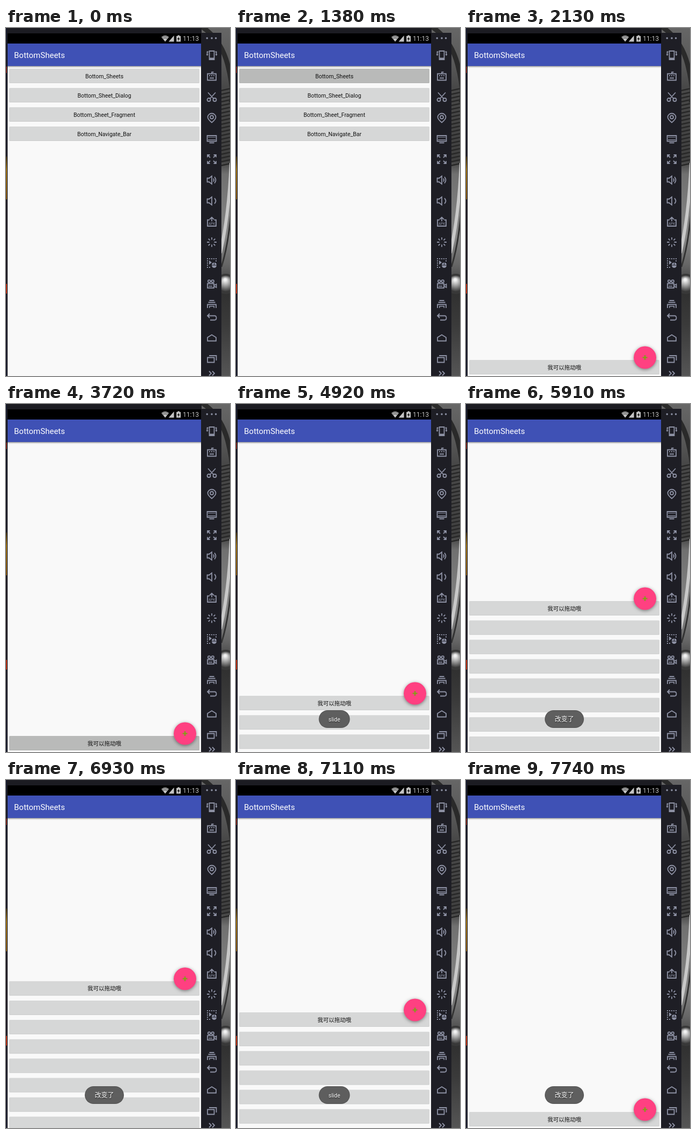
Animation, 418 px wide and 650 px high, one loop 8 s. Source, as an HTML page with a canvas:

```html
<!DOCTYPE html>
<html lang="zh-CN">
<head>
<meta charset="utf-8">
<title>BottomSheets</title>
<style>
html, body { margin: 0; width: 100%; height: 100%; overflow: hidden; background: #1c1c22; }
canvas { display: block; }
</style>
</head>
<body>
<canvas id="stage" width="418" height="650"></canvas>
<script>
const ctx = document.getElementById('stage').getContext('2d');
const LOOP = 8000, STEP = 30;
const FONT = 'Roboto, "Noto Sans CJK SC", "Noto Sans CJK", sans-serif';
const ROW_GAP = 36.15, REST_Y = 620;
const MENU = ['Bottom_Sheets', 'Bottom_Sheet_Dialog', 'Bottom_Sheet_Fragment', 'Bottom_Navigate_Bar'];
const ICON_COLOR = '#8e92a5';

// Sheet position: [time, y, velocity]
const SHEET_KEYS = [
  [4440, 620, -0.08], [4920, 545, -0.22], [5250, 465, -0.24], [5910, 368, 0],
  [6900, 368, 0.25], [7110, 434, 0.38], [7710, 620, 0]
];

// Side bar icons: [y, stroked path, filled path], centred on x = 0
const ICONS = [
  [19, '', 'M-7 0a1.8 1.8 0 1 0-3.6 0a1.8 1.8 0 1 0 3.6 0M1.8 0a1.8 1.8 0 1 0-3.6 0a1.8 1.8 0 1 0 3.6 0M9.4 0a1.8 1.8 0 1 0-3.6 0a1.8 1.8 0 1 0 3.6 0'],
  [51, 'M-4.5-8H4.5V8H-4.5zM-6.5-6.5H-8.5V0M6.5-6.5H8.5V0', 'M-4.5 4.5h9V8h-9zM-10.5-2h4l-2 3zM10.5-2h-4l2 3z'],
  [90, 'M-8-4.5H8V7.5H-8zM0-4.5V-7.5H3.5', 'M-5-2h2v2h-2zM-1-2h2v2h-2zM3-2h2v2h-2zM-4 2.5h8v2h-8z'],
  [129, 'M-7-8.5L3.5 3M7-8.5L-3.5 3M-2.5 5a3 3 0 1 1-6 0a3 3 0 1 1 6 0M8.5 5a3 3 0 1 1-6 0a3 3 0 1 1 6 0', ''],
  [168, 'M0 8.5Q-7.5 2.5-7.5-1.5a7.5 7 0 0 1 15 0Q7.5 2.5 0 8.5zM3-1.5a3 3 0 1 1-6 0a3 3 0 1 1 6 0', ''],
  [207, 'M-8.5-6H8.5V4.5H-8.5zM-4.5 7.5H4.5', 'M-7-3.6H7v1.2H-7zM-7 1H7v1.2H-7z'],
  [245, 'M-8-3.5V-8H-3.5M3.5-8H8V-3.5M8 3.5V8H3.5M-3.5 8H-8V3.5M-7.5-7.5L-3-3M7.5-7.5L3-3M7.5 7.5L3 3M-7.5 7.5L-3 3', ''],
  [284, 'M-8.5-3.5H-5L0-7.5V7.5L-5 3.5H-8.5zM3-3Q5 0 3 3M5-6Q10 0 5 6', ''],
  [323, 'M-8.5-3.5H-5L0-7.5V7.5L-5 3.5H-8.5zM5-5Q10 0 5 5', ''],
  [362, 'M-4.5-3.5H-8V8H8V-3.5H4.5M0-1V-8M-4-4.5L0-8.5L4-4.5', ''],
  [400, 'M0-9V-4.5M0 9V4.5M-9 0H-4.5M9 0H4.5M-6.3-6.3L-3.5-3.5M6.3 6.3L3.5 3.5M6.3-6.3L3.5-3.5M-6.3 6.3L-3.5 3.5', ''],
  [439, '', 'M-5-5L0-1L-5 3zM0 3.5a4.5 4.5 0 0 1 4-4.4V3.5zM5-.9a4.5 4.5 0 0 1 4 4.4H5zM0 4.5H9a4.5 4.5 0 0 1-9 0z'],
  [478, 'M-8-.5H4V7.5H-8zM4.5 2.5L8.5 .5V6.5L4.5 4.5M-2.5-5a2.3 2.3 0 1 1-4.6 0a2.3 2.3 0 1 1 4.6 0M4-5a2.3 2.3 0 1 1-4.6 0a2.3 2.3 0 1 1 4.6 0', 'M-6 3.5h7v1.5h-7z'],
  [516, 'M-4.5-7H4.5M-6.5-3.5H6.5M-8 7V.5H8V7', 'M-5 3h10v1.5h-10zM-5 3h1.5v4h-1.5zM3.5 3h1.5v4h-1.5z'],
  [540, 'M-4-6.5L-8-2.5L-4 1.5M-8-2.5H5Q8.5-2.5 8.5 1.5T5 5.5H-3', ''],
  [579, 'M-8 5.5V-1L0-6L8-1V5.5z', ''],
  [618, 'M-8-2.5H4.5V6.5H-8zM-5-6H8.5V3', ''],
  [645, 'M-5-4L-1 0L-5 4M1-4L5 0L1 4', '']
].map(([y, line, fill]) => [y, new Path2D(line), new Path2D(fill)]);

function box(x, y, w, h, color) {
  ctx.fillStyle = color;
  ctx.fillRect(x, y, w, h);
}

function roundBox(x, y, w, h, r, color) {
  ctx.fillStyle = color;
  ctx.beginPath();
  ctx.roundRect(x, y, w, h, r);
  ctx.fill();
}

function disc(x, y, r, color) {
  ctx.fillStyle = color;
  ctx.beginPath();
  ctx.arc(x, y, r, 0, Math.PI * 2);
  ctx.fill();
}

function curve(path, width, color) {
  ctx.lineWidth = width;
  ctx.strokeStyle = color;
  ctx.stroke(new Path2D(path));
}

function label(text, x, y, size, color, align = 'center') {
  ctx.font = `${size}px ${FONT}`;
  ctx.textAlign = align;
  ctx.fillStyle = color;
  ctx.fillText(text, x, y);
}

function gradient(x0, y0, x1, y1, ...stops) {
  const g = ctx.createLinearGradient(x0, y0, x1, y1);
  stops.forEach(([at, color]) => g.addColorStop(at, color));
  return g;
}

function shadow(color, blur, dy) {
  ctx.shadowColor = color;
  ctx.shadowBlur = blur;
  ctx.shadowOffsetY = dy;
}

function layer(draw) {
  ctx.save();
  draw();
  ctx.restore();
}

function wallpaper() {
  box(0, 0, 418, 650, '#1c1c22');
  box(0, 0, 1.5, 650, gradient(0, 0, 0, 650, [0, '#10152c'], [0.3, '#1b1c2c'], [0.6, '#241c24'], [1, '#1d2138']));
  box(0, 72, 1, 12, '#d8321a');
  box(0, 240, 1.5, 80, gradient(0, 240, 0, 320, [0, '#4b3610'], [0.3, '#d09410'], [1, '#a86c10']));
  box(0, 478, 1.5, 18, '#f03a12');

  // Blurred grey machinery behind the emulator window
  layer(() => {
    ctx.beginPath();
    ctx.rect(365, 0, 53, 650);
    ctx.clip();
    box(365, 0, 53, 650, gradient(0, 0, 0, 650, [0, '#666'], [0.1, '#595959'], [0.17, '#484848'],
      [0.38, '#404040'], [0.42, '#707070'], [0.6, '#868686'], [0.68, '#666'], [0.76, '#303030'], [0.85, '#3a3a3a'], [1, '#555']));
    curve('M366-2Q402 22 414 70T420 140', 9, '#2a2a2a');
    for (let y = 114; y < 256; y += 7) curve(`M401 ${y + 3}L419 ${y - 1}`, 2.5, '#272727');
    curve('M420 252Q416 350 400 420', 6, '#c8c8c8');
    curve('M424 280Q420 390 402 446', 3, '#333');
    disc(410, 478, 19, '#383838');
    const shine = ctx.createRadialGradient(409, 470, 2, 410, 477, 15);
    shine.addColorStop(0, '#f2f2f2');
    shine.addColorStop(0.5, '#999');
    shine.addColorStop(1, '#3c3c3c');
    disc(410, 477, 15, shine);
  });
}

function sideBar(hover) {
  box(364, 9, 38, 641, '#1e1e25');
  if (hover) roundBox(369, 75, 30, 30, 3, '#34353f');
  ctx.lineWidth = 1.8;
  for (const [y, line, fill] of ICONS) layer(() => {
    ctx.translate(384, y);
    ctx.strokeStyle = ctx.fillStyle = ICON_COLOR;
    ctx.stroke(line);
    ctx.fill(fill);
  });
  for (let i = 0; i < 5; i++) {
    box(375 + i * 4, 430, 2, 2, ICON_COLOR);
    if (i) box(375, 430 + i * 4, 2, 2, ICON_COLOR);
    if (i === 1) box(391, 434, 2, 2, ICON_COLOR);
    if (i < 2) box(375 + i * 4, 446, 2, 2, ICON_COLOR);
  }
  label('APK', 384, 367.5, 6.5, ICON_COLOR);
}

function statusBar() {
  box(3, 10, 361, 19, '#000');
  ctx.fillStyle = '#c3c3c3';
  ctx.fill(new Path2D('M290 17Q297 11 304 17L297 25.5z'));
  ctx.fill(new Path2D('M303.5 25.5H313.5V14z'));
  curve('M290.5 18.5Q297 13 303.5 18.5M292.5 20.5Q297 16.5 301.5 20.5', 0.7, '#000');
  ctx.fill(new Path2D('M318 15H320.3V13.5H323.7V15H326V25.5H318z'));
  ctx.fillStyle = '#000';
  ctx.fill(new Path2D('M322.7 16.5L319.5 21H321.7L321.2 24.3L324.5 19.6H322.3z'));
  label('11:13', 360, 24, 12, '#c3c3c3', 'right');
}

function appFrame() {
  box(3, 29, 361, 623, '#f9f9f9');
  box(3, 71, 361, 4, gradient(0, 71, 0, 75, [0, 'rgba(0,0,0,.42)'], [0.5, 'rgba(0,0,0,.12)'], [1, 'rgba(0,0,0,0)']));
  box(3, 29, 361, 42, '#3f51b5');
  label('BottomSheets', 15, 56, 15, '#fff', 'left');
}

function button(y, text, pressed) {
  roundBox(6, y, 355, 27, 1.5, pressed ? '#b9bab9' : '#d6d7d7');
  box(7, y + 26, 353, 1, 'rgba(0,0,0,.05)');
  if (text) label(text, 183.5, y + 17.5, 10.5, '#111');
}

function menuScreen(pressed) {
  appFrame();
  MENU.forEach((text, i) => button(76 + i * 36, text, pressed && i === 0));
}

function sheetScreen(top, pressed) {
  appFrame();
  for (let i = 0, y = top; y < 652; y = top + ++i * ROW_GAP) button(y, i ? '' : '我可以拖动哦', pressed && !i);
  const y = top - 4.5;
  layer(() => {
    shadow('rgba(0,0,0,.45)', 6, 1.5);
    disc(334, y, 21, '#ff4081');
  });
  box(329.5, y - 1, 9, 2, '#78a60c');
  box(333, y - 4.5, 2, 9, '#78a60c');
}

function toast(text, alpha) {
  const slide = text === 'slide', w = slide ? 58 : 73;
  layer(() => {
    ctx.globalAlpha = alpha;
    roundBox(183.5 - w / 2, 572, w, 33, 16.5, 'rgba(72,72,72,.93)');
    roundBox(184.5 - w / 2, 573, w - 2, 31, 15.5, 'rgba(98,98,98,.8)');
    shadow('rgba(0,0,0,.75)', 2, 1);
    label(text, 183.5, 593, slide ? 10.5 : 12, '#fff');
  });
}

function sheetTop(t) {
  const next = SHEET_KEYS.findIndex(key => key[0] > t);
  if (next <= 0) return REST_Y;
  const [t0, y0, v0] = SHEET_KEYS[next - 1], [t1, y1, v1] = SHEET_KEYS[next];
  const d = t1 - t0, u = (t - t0) / d, w = 1 - u;
  return y0 * w * w * (1 + 2 * u) + v0 * d * u * w * w + y1 * u * u * (3 - 2 * u) - v1 * d * u * u * w;
}

function toastText(t) {
  const sliding = (t >= 4530 && t < 5910) || (t >= 6960 && t < 7740);
  return sliding ? 'slide' : '改变了';
}

function render(now) {
  const t = Math.floor((now % LOOP) / STEP) * STEP;
  wallpaper();
  layer(() => {
    ctx.beginPath();
    ctx.rect(3, 29, 361, 621);
    ctx.clip();
    if (t < 2130) menuScreen(t >= 1380 && t < 1770);
    if (t >= 1770) {
      const rest = 1 - Math.min(1, (t - 1740) / 360);
      const scale = 1 - 0.2 * rest ** 5;
      ctx.globalAlpha = 1 - rest * rest;
      ctx.translate(183.5, 331);
      ctx.scale(scale, scale);
      ctx.translate(-183.5, -331);
      sheetScreen(sheetTop(t), t >= 3720 && t < 3780);
    }
  });
  if (t >= 4500) toast(toastText(t), Math.min(1, (t - 4470) / 300));
  statusBar();
  sideBar(t >= 270 && t < 300);
}

const start = performance.now();
function tick() {
  render(performance.now() - start);
  requestAnimationFrame(tick);
}
tick();
</script>
</body>
</html>
```
